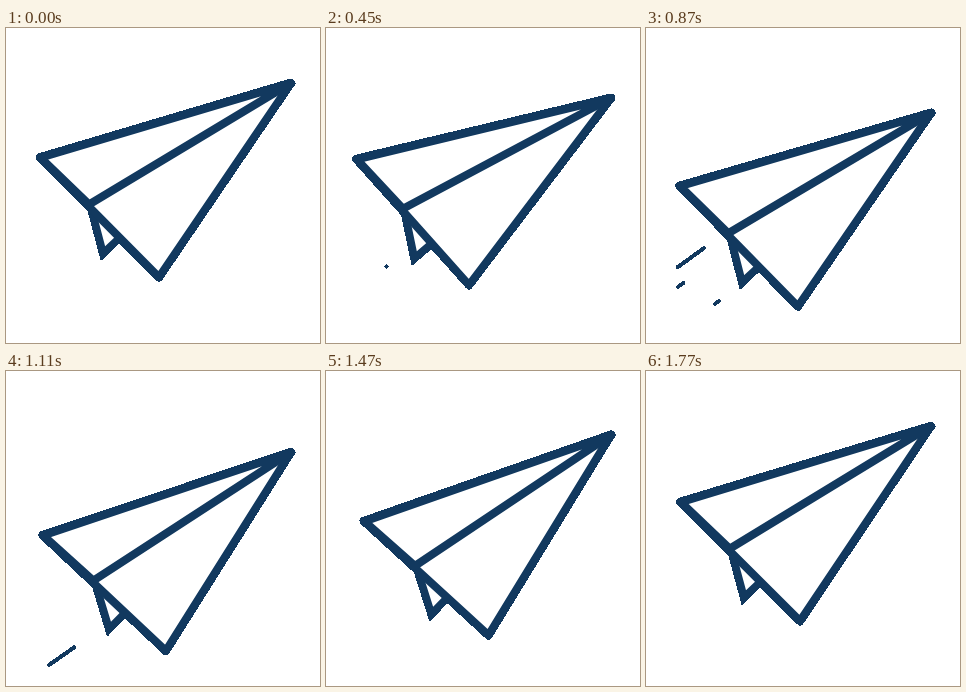
Animation of 314 by 315 pixels, one loop 1800 ms. Source, as an HTML page:

```html
<!DOCTYPE html>
<html lang="en">
<head>
<meta charset="utf-8">
<title>Paper plane</title>
<style>
  html, body { margin: 0; height: 100%; overflow: hidden; background: #fff; }
  svg { display: block; width: 100%; height: 100%; }
  path, line { fill: #fff; stroke: #12395f; stroke-linejoin: round; stroke-linecap: round; }
  #plane { stroke-width: 8.1; }
  #plane .tail { stroke-width: 7.8; stroke-linejoin: miter; stroke-linecap: butt; }
  line { stroke-width: 3.6; }
</style>
</head>
<body>
<svg viewBox="0 0 314 315">
  <!-- hard outer edges; edges against the white fill stay smooth -->
  <filter id="hard" filterUnits="userSpaceOnUse" x="0" y="0" width="314" height="315" color-interpolation-filters="sRGB">
    <feComponentTransfer><feFuncA type="discrete" tableValues="0 1 1 1"/></feComponentTransfer>
  </filter>
  <g filter="url(#hard)">
    <!-- the nose is the origin, so the plane pivots around it -->
    <g id="plane">
      <path class="tail" d="M-200.5 123 L-188 170.5 L-171 154.5"/>
      <path d="M0 0 L-251 74.3 L-132 194.3 Z"/>
      <path d="M0 0 L-250.5 74.6 L-202 121.5 Z"/>
    </g>
    <g id="trails"></g>
  </g>
</svg>
<script>
const LOOP = 1800, STEP = 30;
const plane = document.getElementById('plane');
const group = document.getElementById('trails');

const trails = [
  { begin: 443, from: [60.5, 238.5], to: [32, 258.8] },
  { begin: 598, from: [60.5, 218.3], to: [31.5, 239.3] },
  { begin: 817, from: [73, 273], to: [43, 294] },
];
for (const trail of trails) {
  trail.line = document.createElementNS('http://www.w3.org/2000/svg', 'line');
  group.append(trail.line);
}

const ease = x => (1 - Math.cos(Math.PI * Math.min(1, Math.max(0, x)))) / 2;
const mix = (a, b, p) => a + (b - a) * p;

function drawTrail({ begin, from, to, line }, t) {
  const age = t - begin;
  const head = ease(age / 223), tail = ease((age - 218) / 292);
  line.style.display = head > tail ? '' : 'none';
  line.setAttribute('x1', mix(from[0], to[0], tail));
  line.setAttribute('y1', mix(from[1], to[1], tail));
  line.setAttribute('x2', mix(from[0], to[0], head));
  line.setAttribute('y2', mix(from[1], to[1], head));
}

function draw(t) {
  const phase = 2 * Math.PI * t / LOOP;
  const y = 70 - 15 * Math.cos(phase);
  const tilt = 3 * Math.sin(phase);
  plane.setAttribute('transform', `translate(285 ${y}) rotate(${tilt})`);
  trails.forEach(trail => drawTrail(trail, t));
}

const start = performance.now();
function tick() {
  const t = (performance.now() - start) % LOOP;
  draw(Math.floor(t / STEP) * STEP);
  requestAnimationFrame(tick);
}
tick();
</script>
</body>
</html>
```
